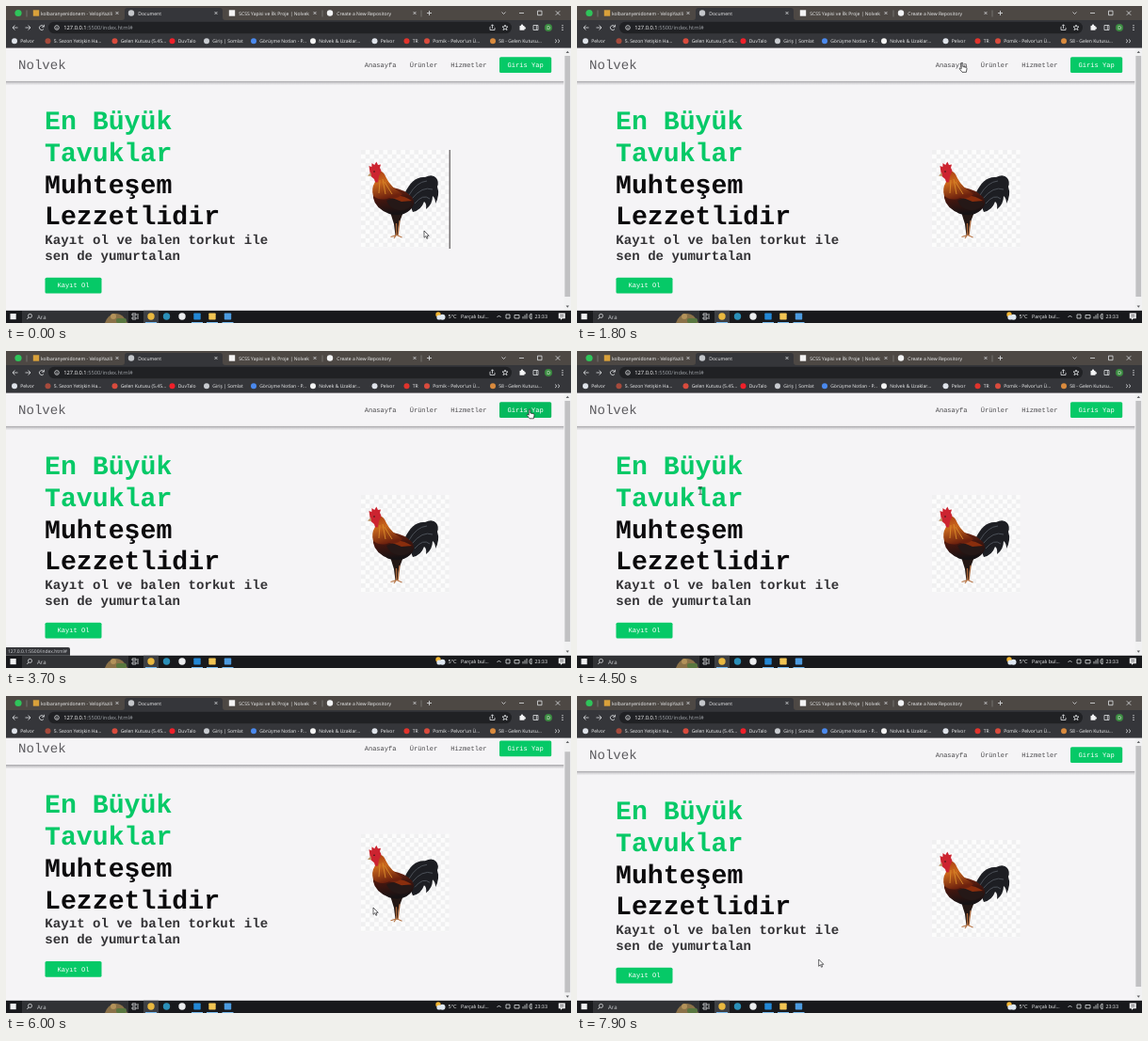
Recreate the animation shown at these times as an HTML page. Size 600 by 337 pixels, loop 8000 ms.

```html
<!DOCTYPE html>
<html lang="tr">
<head>
<meta charset="utf-8">
<title>Document</title>
<style>
html, body { margin: 0; width: 100%; height: 100%; overflow: hidden; background: #f5f4f6; }
svg { display: block; width: 600px; height: 337px; text-rendering: geometricPrecision; }
.ui { font-family: "Open Sans", "Noto Sans", sans-serif; }
.mono { font-family: "Courier New", "Liberation Mono", monospace; }
.b { font-weight: 700; }
.line { fill: none; stroke: #dfe1e4; stroke-width: .8; }
</style>
</head>
<body>
<svg id="stage" viewBox="0 0 600 337" xmlns="http://www.w3.org/2000/svg">
  <defs>
    <clipPath id="view"><rect y="44.6" width="600" height="279.2"/></clipPath>
    <pattern id="check" x="377" y="153" width="9.4" height="9.4" patternUnits="userSpaceOnUse">
      <rect width="9.4" height="9.4" fill="#fcfcfc"/>
      <path d="M0 0h4.7v9.4h4.7v-4.7H0z" fill="#f0f0f1"/>
    </pattern>
    <linearGradient id="shade" x2="0" y2="1">
      <stop stop-color="#98979b"/><stop offset=".4" stop-color="#cbcacd"/>
      <stop offset="1" stop-color="#f5f4f6"/>
    </linearGradient>
    <linearGradient id="neck" x2=".3" y2="1">
      <stop stop-color="#a83a12"/><stop offset=".45" stop-color="#c9671c"/>
      <stop offset="1" stop-color="#6e220e"/>
    </linearGradient>
    <linearGradient id="body" x2=".2" y2="1">
      <stop stop-color="#8a2e10"/><stop offset=".5" stop-color="#43160f"/>
      <stop offset="1" stop-color="#161214"/>
    </linearGradient>
  </defs>

  <rect width="600" height="337" fill="#f5f4f6"/>
  <g clip-path="url(#view)">
    <g id="page">
      <rect y="79.6" width="592.5" height="4.6" fill="url(#shade)"/>
      <rect y="38" width="592.5" height="41.8" fill="#f5f4f6"/>
      <rect id="login" x="524" y="54.2" width="55.2" height="16.8" rx="1.6"/>
      <rect x="41.5" y="288.7" width="60" height="16.8" rx="1.6" fill="#06c967"/>
      <g id="copy" class="mono"></g>
      <rect x="377" y="153" width="93.5" height="104" fill="url(#check)"/>
      <g id="bird">
        <path d="M423 200C429 187 436 181 445 182Q453 178 457 183Q460 187 458 192Q461 201 456 210Q456 204 453 202Q453 211 446 216Q447 210 444 208Q441 217 432 219Q429 209 423 200Z" fill="#1d1e23"/>
        <path d="M428 201Q436 187 447 186M431 205Q442 191 453 195M434 210Q443 199 450 205" fill="none" stroke="#51565e" stroke-width=".9"/>
        <path d="M408 219H422L417 232L416 244H413.5L412 232Z" fill="#241815"/>
        <path d="M414.5 231V244M418 228L416 244" stroke="#a9673a" stroke-width="1.3"/>
        <path d="M408.5 245.5L415 243.5L420.5 246M414 244L412 247" fill="none" stroke="#b87545" stroke-width="1.1"/>
        <path d="M390 196Q397 189 411 193Q423 195 431 203Q436 210 429 217Q420 225 407 221Q392 215 390 204Z" fill="url(#body)"/>
        <path d="M404 207Q415 201 432 210Q427 218 417 217Q407 215 404 207Z" fill="#251817"/>
        <path d="M408 203Q419 199 431 207L420 208Z" fill="#8a2e0d"/>
        <path d="M393 176Q400 173 403.5 182Q408 192 421 200Q415 206 407 204Q398 208 390 202Q387.5 194 392 187Z" fill="url(#neck)"/>
        <path d="M397 185L396 199M400 184L403 200M402 187L410 200" stroke="#d98c2b" stroke-width=".9" fill="none"/>
        <path d="M386.5 177L385.5 170L388.3 171L388.5 167L391.3 169L393.3 165.5L395 169L398 168.5L397 172L398.5 175L396 181L395 187Q392 189 391 184L387.5 181Z" fill="#cc2430"/>
        <path d="M387.5 177L384 180.5L388 181Z" fill="#b9935f"/>
        <circle cx="391" cy="176" r=".8" fill="#2a1511"/>
      </g>
      <path id="caret" d="M471.2 153V258" stroke="#3d393b" stroke-width="1"/>
    </g>
    <rect x="592.5" y="44" width="7.5" height="280" fill="#f1f1f2"/>
    <path d="M594.6 50L596.3 47.8L598 50ZM594.6 318.6L596.3 320.8L598 318.6Z" fill="#606164"/>
    <rect id="thumb" x="593.4" y="53" width="5.7" height="256" fill="#c1c1c3"/>
    <g id="status" class="ui">
      <path d="M0 315H66Q68 315 68 317V324H0Z" fill="#35363a"/>
      <text x="2" y="321.2" font-size="4.95" fill="#d2d4d8">127.0.0.1:5500/index.html#</text>
    </g>
  </g>
  <g id="chrome" class="ui"></g>
  <g id="taskbar" class="ui"></g>
  <g id="cursor" stroke-linejoin="round"></g>
</svg>
<script>
const $ = id => document.getElementById(id);
const text = (x, y, s, size, fill, cls = "") =>
  `<text x="${x}" y="${y}" font-size="${size}" fill="${fill}" class="${cls}">${s}</text>`;
const rect = (x, y, w, h, fill, r = 0) =>
  `<rect x="${x}" y="${y}" width="${w}" height="${h}" rx="${r}" fill="${fill}"/>`;
const dot = (x, y, r, fill) => `<circle cx="${x}" cy="${y}" r="${r}" fill="${fill}"/>`;
const line = d => `<path class="line" d="${d}"/>`;
const cross = (x, y, r) => line(`M${x - r} ${y - r}l${2 * r} ${2 * r}m0 ${-2 * r}l${-2 * r} ${2 * r}`);

const GREEN = "#06c967", INK = "#0b0a0c", SOFT = "#48474a", LIGHT = "#f3f4f5";

function buildCopy() {
  const head = ["En Büyük", "Tavuklar", "Muhteşem", "Lezzetlidir"];
  const nav = [[380.7, "Anasayfa"], [428.7, "Ürünler"], [472.3, "Hizmetler"]];
  $("copy").innerHTML =
    text(13, 67, "Nolvek", 14.1, "#5c5b5f") +
    nav.map(([x, s]) => text(x, 65, s, 7.05, SOFT)).join("") +
    text(532.4, 65, "Giris Yap", 7.1, "#fff") +
    head.map((s, i) => text(41, 131 + i * 33.8, s, 28.2, i < 2 ? GREEN : INK, "b")).join("") +
    text(41.3, 253, "Kayıt ol ve balen torkut ile", 14.1, "#333235", "b") +
    text(41.3, 270, "sen de yumurtalan", 14.1, "#333235", "b") +
    text(54.5, 299.3, "Kayıt Ol", 7.1, "#fff");
}

function buildChrome() {
  const tabs = [
    [32, "#d9a13a", "kolbaranyenidonem - VelopYazili", 118],
    [133, "#c4c7cb", "Document", 223],
    [240, "#f4f4f4", "SCSS Yapisi ve İlk Proje | Nolvek", 328],
    [344, "#f2f3f4", "Create a New Repository", 434]
  ];
  const marks = [
    [9, "#dfe3ea", "Pelvor"], [44.5, "#a64a3c", "5. Sezon Yetişkin Ha..."],
    [115.5, "#d94b3d", "Gelen Kutusu (5.45..."], [176.5, "#f0202a", "DuvTalo"],
    [213, "#c9ccd1", "Giriş | Somlat"], [263, "#4a89ee", "Görüşme Notları - P..."],
    [326, "#f4f4f4", "Nolvek &amp; Uzaklar..."], [391.5, "#dfe3ea", "Pelvor"],
    [425.5, "#e0332c", "TR"], [447, "#d94b3d", "Pomik - Pelvor'un Ü..."],
    [517, "#d98a3d", "58 - Gelen Kutusu..."]
  ];
  $("chrome").innerHTML =
    rect(0, 0, 600, 16, "#4d4844") + rect(0, 15, 600, 29.6, "#35363a") +
    `<path d="M123 15Q126 15 126 12V5Q126 2 129 2H227Q230 2 230 5V12Q230 15 233 15Z" fill="#35363a"/>` +
    line("M22 4.5V11.5M336 4.5V11.5M441 4.5V11.5").replace("/>", ' opacity=".35"/>') +
    dot(13, 7.5, 3.6, "#2fc45a") +
    tabs.map(([x, c, s, end], i) =>
      (i % 2 ? dot(x, 7.5, 3.2, c) : rect(x - 3.2, 4.3, 6.4, 6.4, c)) +
      text(x + (i ? 7.3 : 5), 9.6, s, 5.05, LIGHT) + cross(end, 7.5, 1.4)).join("") +
    line("M449.5 5V10M447 7.5H452M526.5 6.5L528.5 8.5L530.5 6.5M545 7.5H550M564.5 5.2H569V9.7H564.5Z") +
    cross(586, 7.5, 2.2) +
    rect(45, 16.8, 492, 12.4, "#202124", 6.2) +
    line("M12.5 23H7M9.4 20.5L7 23L9.4 25.5M20.5 23H26M23.6 20.5L26 23L23.6 25.5") +
    line("M40.2 22A2.5 2.5 0 1 0 40 24.5M40.4 19.8V22.2H38") +
    `<circle class="line" cx="54" cy="23" r="2.3"/>` + line("M54 22.6V24.4") +
    `<text x="61.3" y="25.2" font-size="5.75" fill="#fff">127.0.0.1<tspan fill="#9fa3a8">:5500/index.html#</tspan></text>` +
    line("M514 22V25.5H519V23M516.5 24V19.8M515 21.3L516.5 19.8L518 21.3") +
    line("M530 20L530.8 22H533L531.3 23.4L532 25.6L530 24.3L528 25.6L528.7 23.4L527 22H529.2Z") +
    rect(545.5, 21, 5, 4.8, LIGHT, .6) + dot(548, 20.7, 1.2, LIGHT) + dot(550.7, 23.4, 1.2, LIGHT) +
    line("M560 20.5H565V25.5H560ZM563.3 20.5V25.5") +
    dot(576, 23, 4, "#3c8c42") + text(574.3, 25, "D", 5.2, "#fff") +
    [20.6, 23, 25.4].map(y => dot(591, y, .65, LIGHT)).join("") +
    marks.map(([x, c, s]) => dot(x, 37.3, 3, c) + text(x + 6.2, 39.2, s, 5.05, LIGHT)).join("") +
    line("M583 35.5L585 37.3L583 39.1M586 35.5L588 37.3L586 39.1");
}

function buildTaskbar() {
  const apps = [[154, "#e9b83f", 1], [170.5, "#2b8fb8", 0], [187, "#eceef0", 0],
    [203, "#2388d6", 1], [219, "#f1c453", 1], [235.5, "#4c9be0", 1]];
  $("taskbar").innerHTML =
    rect(0, 323.8, 600, 13.2, "#18191c") + rect(4.5, 327, 6.2, 6.2, "#f0f1f2") +
    rect(17, 324, 113, 13, "#313235") +
    `<circle class="line" cx="25.5" cy="329.4" r="2"/>` + line("M24 331L22.3 333") +
    text(33, 332.5, "Ara", 6.1, "#c9cbce") +
    `<path d="M105 337Q108 328 116 327Q124 326 129 337Z" fill="#8a7148"/>` +
    dot(114, 330, 3, "#b3925a") + rect(117, 332, 11, 5, "#58773f", 2) +
    line("M134 327H138V329H134ZM134 331H138V333H134ZM140 327V333") +
    rect(146, 323.8, 16, 13.2, "#3d3f43") +
    apps.map(([x, c, open], i) =>
      (i < 3 ? dot(x, 330, 3.7, c) : rect(x - 3.7, 326.5, 7.4, 7, c, .7)) +
      (open ? rect(x - 6, 336, 12, 1, "#76b9ed") : "")).join("") +
    dot(459, 328, 2.7, "#f3b531") + dot(460, 331, 2.6, "#dfe8f2") + dot(463.5, 330.8, 3, "#dfe8f2") +
    text(469.5, 332.3, "5°C", 5.6, LIGHT) + text(483, 332.3, "Parçalı bul...", 5.3, LIGHT) +
    line("M521.5 331L523.5 329L525.5 331M531 328H535V332H531ZM540 328.5H545V332H540Z") +
    line("M549 332.5V330M551 332.5V328.5M553 332.5V327M556 328.5V331.5L558 333V327Z") +
    text(561.4, 332.2, "23:33", 5.3, LIGHT) +
    `<path d="M586.8 326.6H593.8V332.2H590.7L589 334V332.2H586.8Z" fill="#f3f4f5"/>` +
    `<path d="M588.3 328.5H592.3M588.3 330.3H592.3" stroke="#18191c" stroke-width=".6"/>`;
}

const shapes = {
  arrow: `<path d="M0 0V7.3L1.7 5.7L2.9 8.3L4 7.8L2.9 5.3H5.2Z" fill="#fff" stroke="#17171a" stroke-width=".65"/>`,
  hand: `<path d="M-.8 .8A.8 .8 0 0 1 .8 .8V4L4.4 4.8Q5.2 5 5 6.2L4.4 9.8H0L-2.7 6.4Q-3 5.2 -2 5.2L-.8 6.3Z" fill="#fff" stroke="#17171a" stroke-width=".7"/>`,
  beam: `<path d="M-1.9 -3.8H1.9M0 -3.8V3.8M-1.9 3.8H1.9" stroke="#20302a" stroke-width=".8"/>`
};

// time, x, y
const path = [
  [0, 444, 239], [600, 494, 66], [900, 455, 66], [1200, 440, 60], [1500, 420, 49],
  [1800, 409, 60.5], [2100, 440, 61], [2400, 582, 51], [2700, 520, 66], [3000, 476.5, 66],
  [3300, 545, 63], [3700, 556, 62], [4100, 350, 110], [4500, 131, 148.5], [5000, 75, 296],
  [5400, 85, 296], [6000, 390, 225], [6700, 387, 226], [7200, 577, 121], [7900, 256.7, 280], [8000, 256.7, 280]
];
// time, page offset
const scroll = [[0, 0], [5700, 0], [5900, 6.7], [6500, 6.7], [6800, 0], [8000, 0]];
const statusOn = [[1100, 1600], [2200, 3900], [4900, 5500]];
// left, top, right, bottom
const links = [[380, 57, 415, 69], [428, 57, 459, 69], [472, 57, 511, 69], [524, 54, 580, 71], [41, 289, 102, 306]];
const words = [[41, 108, 178, 172], [41, 174, 230, 240], [41, 241, 279, 274], [13, 54, 64, 71]];

function sample(keys, t) {
  const i = Math.max(1, keys.findIndex(k => k[0] > t));
  const a = keys[i - 1], b = keys[i];
  const p = (t - a[0]) / (b[0] - a[0]), e = p * p * (3 - 2 * p);
  return a.slice(1).map((v, j) => v + (b[j + 1] - v) * e);
}
const inside = (x, y) => ([l, t, r, b]) => x >= l && x <= r && y >= t && y <= b;
const show = (id, on) => $(id).setAttribute("visibility", on ? "visible" : "hidden");

let shape = "";
function draw(t) {
  const [x, y] = sample(path, t), [offset] = sample(scroll, t);
  const over = inside(x, y + offset);
  const next = links.some(over) ? "hand" : words.some(over) ? "beam" : "arrow";
  if (next !== shape) $("cursor").innerHTML = shapes[shape = next];
  $("cursor").setAttribute("transform", `translate(${x.toFixed(2)} ${y.toFixed(2)})`);
  $("page").setAttribute("transform", `translate(0 ${-offset})`);
  $("thumb").setAttribute("y", 53 + offset * .93);
  $("login").setAttribute("fill", over(links[3]) ? "#04b95d" : GREEN);
  show("caret", (t + 285) % 1050 < 525);
  show("status", statusOn.some(([a, b]) => t >= a && t < b));
}

buildCopy();
buildChrome();
buildTaskbar();
const start = performance.now();
function tick(now) {
  const t = Math.max(0, now - start) % 8000;
  draw(Math.floor(t / 100) * 100);
  requestAnimationFrame(tick);
}
draw(0);
requestAnimationFrame(tick);
</script>
</body>
</html>
```
